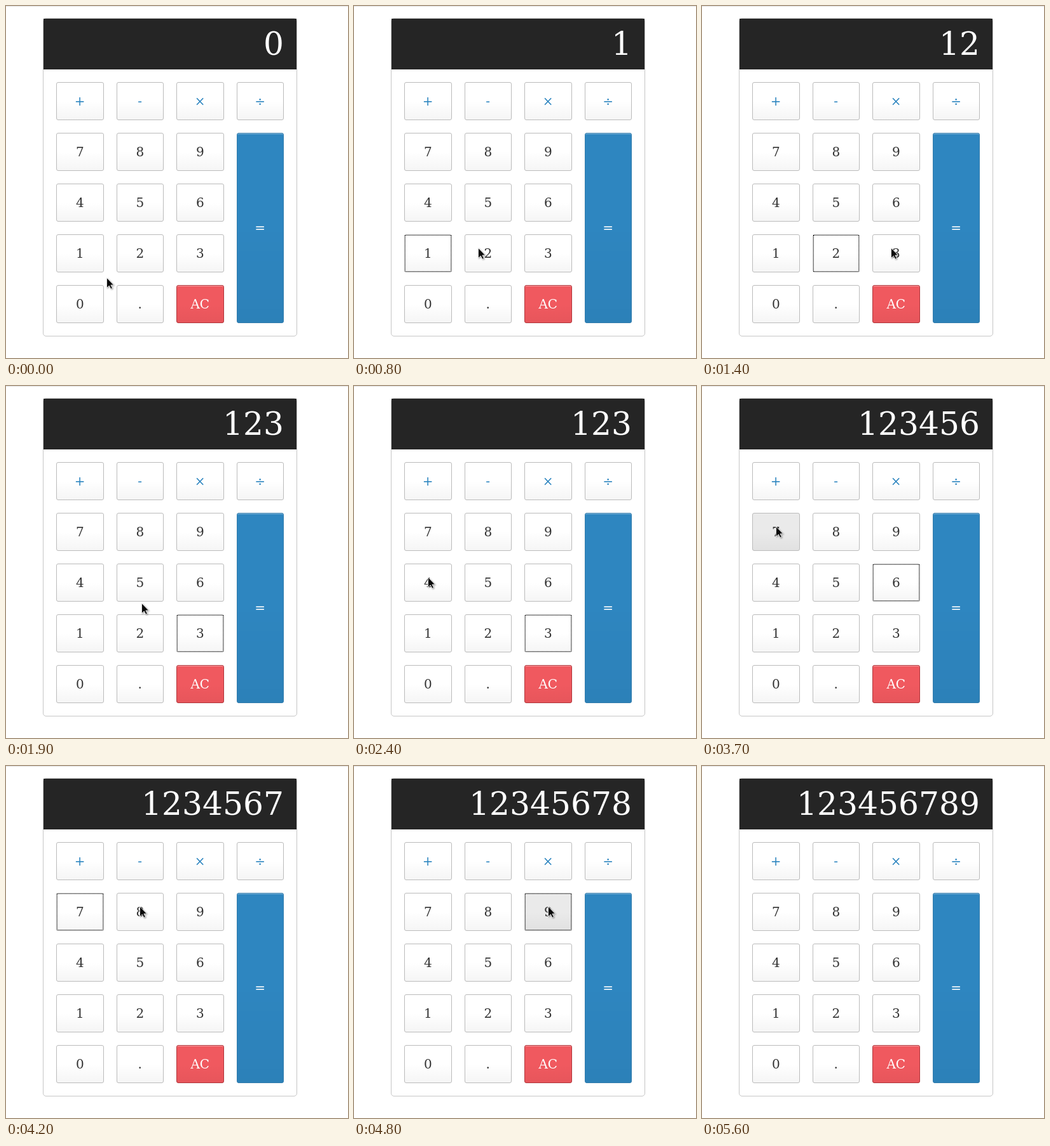
An HTML page that plays this animation: 538 px wide and 555 px high, repeating every 5700 ms.

```html
<!DOCTYPE html>
<html lang="en">
<head>
<meta charset="utf-8">
<title>Calculator</title>
<style>
  html, body { margin: 0; width: 100%; height: 100%; overflow: hidden; background: #fff; }
  body { position: relative; box-sizing: border-box; border-top: 1px solid #e4e4e4; font-family: "DejaVu Serif", serif; }
  .calculator {
    position: absolute; left: 58px; top: 18px; width: 398px; height: 500px;
    border: 1px solid #c6c6c6; border-radius: 5px;
  }
  .display {
    height: 80px; padding-right: 20px; background: #252525; color: #fff;
    font-size: 50.3px; line-height: 80px; text-align: right;
  }
  .keys {
    display: grid; grid-template-columns: repeat(4, 1fr); grid-auto-rows: 60px;
    gap: 20px; padding: 20px;
  }
  .key {
    position: relative; box-sizing: border-box; display: flex;
    align-items: center; justify-content: center;
    border: 1px solid #bbb; border-radius: 3px;
    background: #fff linear-gradient(transparent 50%, rgba(0, 0, 0, .04));
    color: #333; font-size: 20px; line-height: 1;
  }
  .operator { color: #2e86c0; }
  .equals, .clear { color: #fff; box-shadow: inset 0 1px rgba(255, 255, 255, .45); }
  .equals { grid-area: 2 / 4 / 6 / 5; background-color: #2e86c0; border-color: #337cac; }
  .clear { background-color: #f0595f; border-color: #b0353a; }
  .pressed { background-color: #eaeaea; }
  .focused::after { content: ""; position: absolute; inset: 0; border: 1px dotted #000; }
  .cursor {
    position: absolute; left: 0; top: -1px; overflow: visible;
    filter: drop-shadow(1px 1px 1px rgba(0, 0, 0, .4));
  }
</style>
</head>
<body>
<div class="calculator">
  <div class="display"></div>
  <div class="keys"></div>
</div>
<svg class="cursor" width="13" height="19">
  <path d="M.5 .5V16.5L4.3 13L7 18.2L9.4 17L6.9 12H11.5Z" fill="#0a0a0a" stroke="#fff" stroke-width=".8"/>
</svg>
<script>
const LOOP = 5700, STEP = 100, CURSOR_GONE = 5100, BLUR = 5600;

// Each key is pressed, takes focus one step later and is released after another step.
const releases = [760, 1250, 1900, 2650, 3120, 3700, 3900, 4500, 4900];
const clicks = releases.map((up, i) => ({
  x: 116 + i % 3 * 94.5,
  y: 381 - Math.floor(i / 3) * 80,
  down: up - 2 * STEP,
  focus: up - STEP,
  up
}));

// The pointer leaves a key as it takes focus and reaches the next one as it is pressed.
const stops = [
  { x: 158, y: 428, focus: STEP },
  ...clicks,
  { x: 107, y: 150, down: CURSOR_GONE }
];

const display = document.querySelector(".display");
const cursor = document.querySelector(".cursor");
const keys = {};
for (const label of "+ - × ÷ 7 8 9 = 4 5 6 1 2 3 0 . AC".split(" ")) {
  const key = document.createElement("div");
  const kind = "+-×÷".includes(label) ? "operator" : { "=": "equals", AC: "clear" }[label] || "";
  key.className = "key " + kind;
  key.textContent = label;
  document.querySelector(".keys").append(key);
  keys[label] = key;
}

const easeOut = u => 1 - (1 - u) ** 4;

function pointerAt(t) {
  const next = Math.max(1, stops.findLastIndex(s => t >= s.focus) + 1);
  const from = stops[next - 1], to = stops[next];
  const u = (t - from.focus) / (to.down - from.focus);
  const k = easeOut(Math.min(1, Math.max(0, u)));
  return [from.x + (to.x - from.x) * k, from.y + (to.y - from.y) * k].map(Math.round);
}

function draw(now) {
  const t = Math.floor(now % LOOP / STEP) * STEP;
  const focused = t < BLUR ? clicks.filter(c => t >= c.focus).length : 0;
  const typed = clicks.filter(c => t >= c.up).length;

  display.textContent = "123456789".slice(0, typed) || "0";
  clicks.forEach(({ down, up }, i) => {
    const { classList } = keys[i + 1];
    classList.toggle("pressed", t >= down && t < up);
    classList.toggle("focused", focused === i + 1);
  });

  const [x, y] = pointerAt(t);
  cursor.style.transform = `translate(${x}px, ${y}px)`;
  cursor.style.display = t < CURSOR_GONE ? "block" : "none";
}

const start = performance.now();
function tick() {
  draw(performance.now() - start);
  requestAnimationFrame(tick);
}
tick();
</script>
</body>
</html>
```
